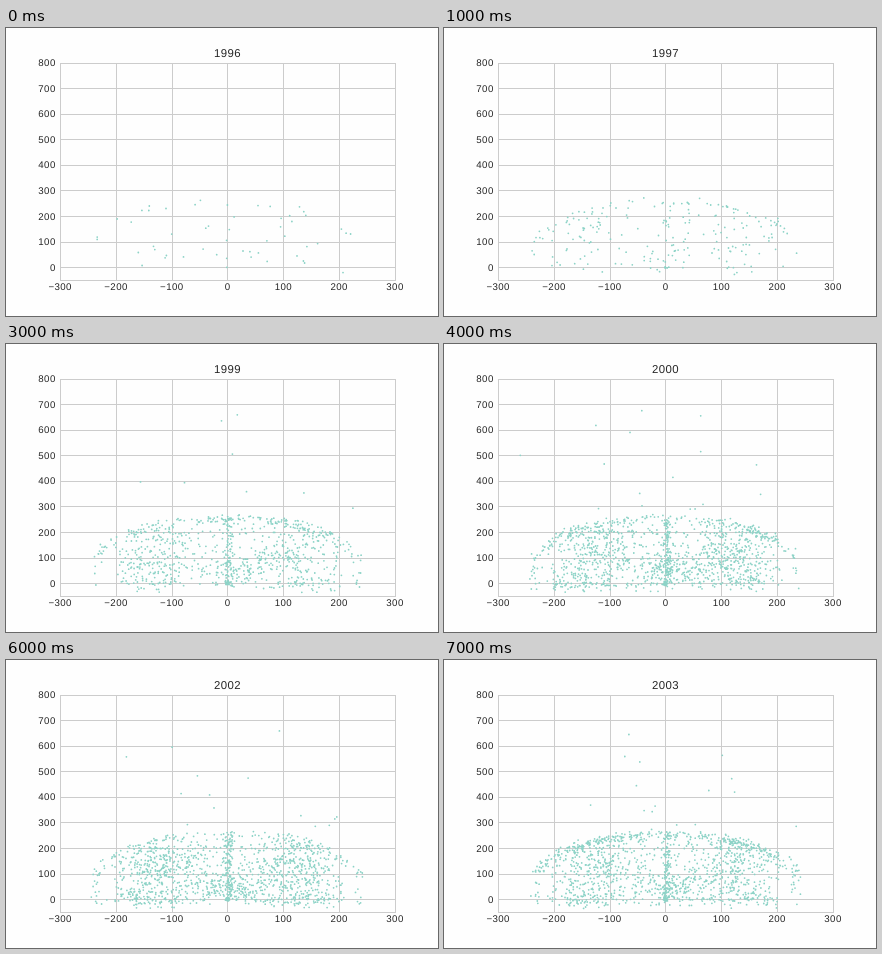
An HTML page that plays this animation: 432x288 px, repeating every 8000 ms.

```html
<!DOCTYPE html>
<html lang="en">
<head>
<meta charset="utf-8">
<title>Shots by season</title>
<style>
  html, body { margin: 0; width: 100%; height: 100%; overflow: hidden; background: #fefefe; }
  svg { display: block; width: 432px; height: 288px; }
  text {
    font: 9.7px "Liberation Sans", Arial, sans-serif;
    letter-spacing: 0.4px;
    text-rendering: geometricPrecision;
    fill: #262626;
  }
  .title { font-size: 11.4px; }
  .mid { text-anchor: middle; }
  .end { text-anchor: end; }
  .grid { stroke: #ccc; fill: none; }
  .dots { stroke: #8dd3c7; stroke-width: 1.8; stroke-linecap: round; fill: none; }
  .year { visibility: hidden; animation: show 8s steps(1, end) infinite; }
  @keyframes show {
    0% { visibility: visible; }
    12.5%, 100% { visibility: hidden; }
  }
</style>
</head>
<body>
<svg id="chart" viewBox="0 0 432 288"></svg>
<script>
const chart = document.getElementById('chart');
const px = x => 221.4 + x * 0.558;
const py = y => 239.2 - y * 0.2558;

function add(parent, tag, attrs, text = '') {
  const el = document.createElementNS('http://www.w3.org/2000/svg', tag);
  for (const key in attrs) el.setAttribute(key, attrs[key]);
  el.textContent = text;
  return parent.appendChild(el);
}

function drawAxes() {
  let d = 'M54 252.5H390';
  for (let x = -300; x <= 300; x += 100) {
    d += `M${Math.round(px(x)) + 0.5} 35V253`;
    add(chart, 'text', { x: px(x) + 0.2, y: 262, class: 'mid' }, String(x).replace('-', '\u2212'));
  }
  for (let y = 0; y <= 800; y += 100) {
    d += `M54 ${Math.round(py(y)) + 0.5}H390`;
    add(chart, 'text', { x: 49.7, y: py(y) + 3.5, class: 'end' }, y);
  }
  add(chart, 'path', { d, class: 'grid' });
}

function random(seed) {
  return () => {
    seed = (seed + 0x6d2b79f5) | 0;
    let t = Math.imul(seed ^ (seed >>> 15), 1 | seed);
    t = (t + Math.imul(t ^ (t >>> 7), 61 | t)) ^ t;
    return ((t ^ (t >>> 14)) >>> 0) / 4294967296;
  };
}

// Shot zones in court units, the hoop at 0,0
function zones(rnd) {
  const span = (a, b) => a + (b - a) * rnd();
  const bell = (mean, dev) => mean + dev * (rnd() + rnd() + rnd() + rnd() - 2) * 1.73;
  const side = () => (rnd() < 0.5 ? -1 : 1);
  return {
    rim: () => [bell(0, 1.5), bell(0, 3)],
    lane: () => [bell(3, 4), span(0, 262)],
    key: () => [bell(8, 38), bell(55, 28)],
    wing: () => [side() * bell(122, 34), bell(125, 52)],
    base: () => [side() * bell(145, 30), bell(5, 22)],
    fill: () => [span(-205, 205), span(-25, 255)],
    row: () => [span(-180, 180), rnd() < 0.5 ? bell(0, 4) : bell(199, 5)],
    edge: () => [side() * bell(234, 5), span(-25, 110)],
    arc: () => {
      const a = rnd() < 0.2 ? Math.PI / 2 + side() * bell(0.56, 0.1) : span(0.4, 2.74);
      const r = bell(256, 8);
      return [r * Math.cos(a), r * Math.sin(a)];
    },
    far: () => [bell(30, 110), 285 + 400 * rnd() ** 1.6]
  };
}

const inCourt = ([x, y]) => y > -36 && Math.abs(x) < 244 && Math.hypot(x, y) < 280;

// Share of each zone among the shots inside the arc
const mix = { rim: 0.03, lane: 0.08, key: 0.12, wing: 0.28, base: 0.1, fill: 0.33, row: 0.04, edge: 0.02 };

const seasons = [
  { shots: 54, arc: 0.2, far: 0 },
  { shots: 220, arc: 0.25, far: 0 },
  { shots: 430, arc: 0.26, far: 9 },
  { shots: 900, arc: 0.16, far: 8 },
  { shots: 1400, arc: 0.12, far: 16 },
  { shots: 1200, arc: 0.07, far: 9 },
  { shots: 1450, arc: 0.06, far: 14 },
  { shots: 1450, arc: 0.2, far: 15 }
];

function drawSeason({ shots, arc, far }, i) {
  const zone = zones(random(1996 + i));
  let d = '';
  const scatter = (name, count) => {
    for (let k = 0; k < Math.round(count); k++) {
      let shot;
      do shot = zone[name](); while (name !== 'far' && !inCourt(shot));
      d += `M${px(shot[0]).toFixed(1)} ${py(shot[1]).toFixed(1)}h.01`;
    }
  };
  for (const name in mix) scatter(name, shots * (1 - arc) * mix[name]);
  scatter('arc', shots * arc);
  scatter('far', far);

  const group = add(chart, 'g', { class: 'year', style: `animation-delay:${i - 8}s` });
  add(group, 'path', { d, class: 'dots' });
  add(group, 'text', { x: 221.6, y: 29, class: 'title mid' }, 1996 + i);
}

drawAxes();
seasons.forEach(drawSeason);
</script>
</body>
</html>
```
